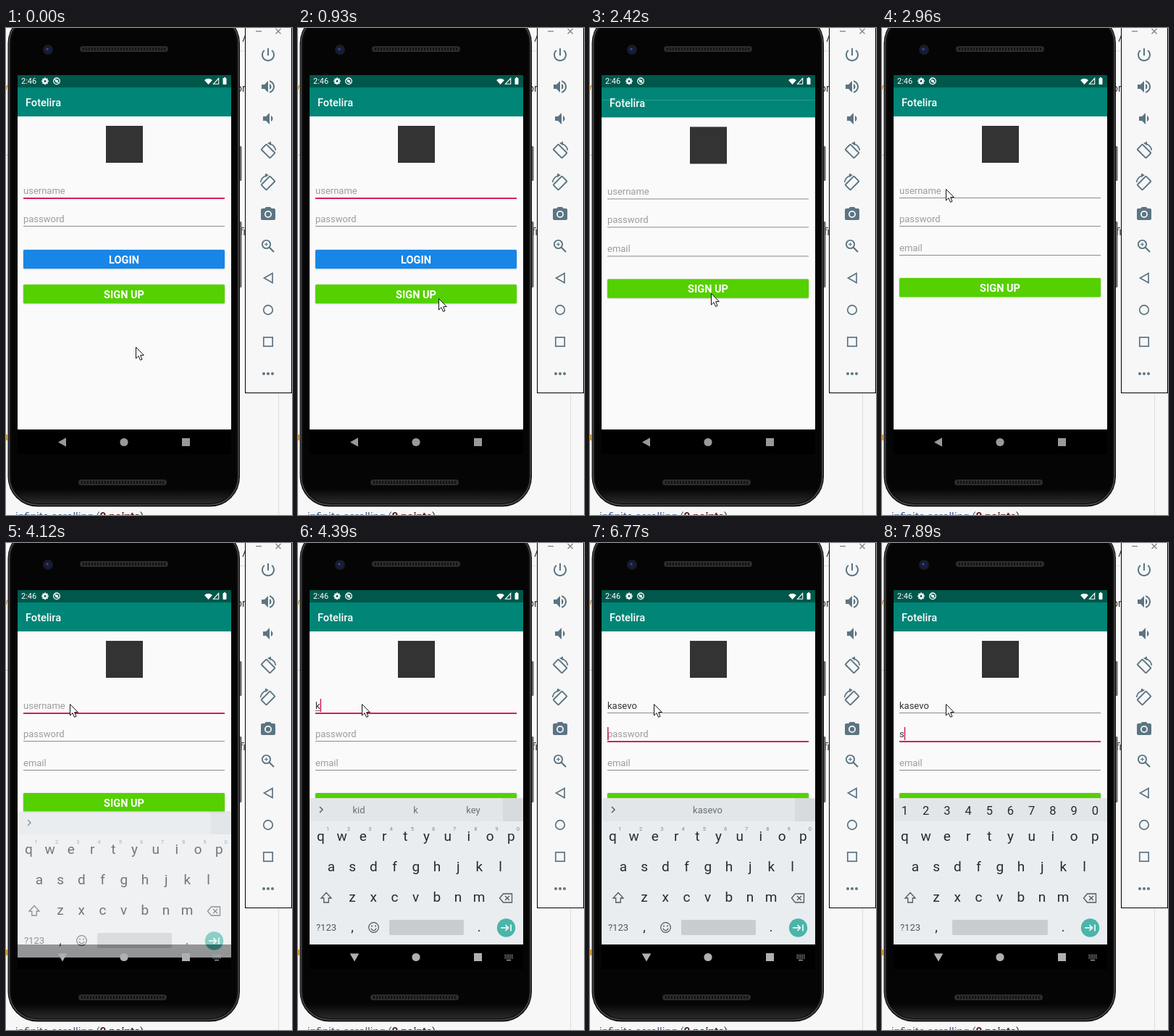
Animation, 395 px wide and 672 px high, one loop 8 s. Source, as an HTML page with a canvas:

```html
<!DOCTYPE html>
<html lang="en">
<head>
<meta charset="utf-8">
<title>Sign-up flow</title>
<style>
html, body { margin: 0; width: 100%; height: 100%; overflow: hidden; background: #f7f7f7; }
canvas { display: block; width: 395px; height: 672px; }
</style>
</head>
<body>
<canvas id="stage"></canvas>
<script>
const W = 395, H = 672, LOOP = 8000;
const dpr = window.devicePixelRatio || 1;

function prepare(canvas) {
  canvas.width = W * dpr;
  canvas.height = H * dpr;
  return canvas.getContext('2d');
}

const stage = prepare(document.getElementById('stage'));
const layer = prepare(document.createElement('canvas'));
let c = stage;

const FONT = 'Roboto, sans-serif';
const PAGE = '#f7f7f7', PINK = '#d81b60', GREEN = '#55d000', BLUE = '#1886e6';
const SLATE = '#5b7583', INK = '#4b585f', KEY = '#222c31';
const NAME = 'kasevo';

// Each list holds [start time, value]; the latest started value applies.
const pointer = [[0, [179, 440]], [270, [180, 440]], [420, [182, 435]], [540, [182, 422]],
  [660, [181, 407]], [810, [189, 387]], [930, [194, 373]], [1080, [182, 369]], [1200, [167, 366]],
  [2720, [140, 318]], [2840, [105, 253]], [2960, [88, 222]]];
const caretOn = [[0, 0], [150, 1], [660, 0], [1080, 1], [1580, 0], [2180, 1], [2300, 0], [3540, 1],
  [4120, 0], [4390, 1], [5690, 0], [6250, 1], [6650, 0], [6770, 1], [7300, 0], [7890, 1]];
const typed = [[0, 0], [4390, 1], [4830, 2], [4980, 3], [5110, 5], [5260, 6]];
const ripple = [[0, [0, 0]], [1880, [133, .12]], [2030, [300, .09]], [2180, [0, 0]]];
const reveal = [[0, 0], [2300, .5], [2420, .93], [2570, 1]];
const backTurn = [[0, 0], [3540, .3], [3660, .75], [3810, 1]];
const keysIn = [[0, [0, 0]], [4120, [.63, 18]], [4270, [.93, 4]], [4390, [1, 0]]];
const hints = [[0, ''], [4390, 'kid key'], [4830, 'kale kay'], [4980, 'case kart'], [5110, 'cases keen'], [5260, '']];

function at(track, t) {
  let value = track[0][1];
  for (const [start, v] of track) if (t >= start) value = v;
  return value;
}

function rect(x, y, w, h, fill) {
  c.fillStyle = fill;
  c.fillRect(x, y, w, h);
}

function round(x, y, w, h, r, fill) {
  c.beginPath();
  c.roundRect(x, y, w, h, r);
  c.fillStyle = fill;
  c.fill();
}

function disc(x, y, r, fill) {
  c.beginPath();
  c.arc(x, y, r, 0, 7);
  c.fillStyle = fill;
  c.fill();
}

function arc(x, y, r, from, to, color, width) {
  c.beginPath();
  c.arc(x, y, r, from, to);
  c.strokeStyle = color;
  c.lineWidth = width;
  c.stroke();
}

function ring(x, y, r, color, width) {
  arc(x, y, r, 0, 7, color, width);
}

function line(points, color, width, closed) {
  c.beginPath();
  points.forEach(([x, y]) => c.lineTo(x, y));
  if (closed) c.closePath();
  c.strokeStyle = color;
  c.lineWidth = width;
  c.stroke();
}

function poly(points, fill) {
  c.beginPath();
  points.forEach(([x, y]) => c.lineTo(x, y));
  c.fillStyle = fill;
  c.fill();
}

function text(s, x, y, size, color, align = 'left', weight = 400) {
  c.font = `${weight} ${size}px ${FONT}`;
  c.textAlign = align;
  c.fillStyle = color;
  c.fillText(s, x, y);
  return x + c.measureText(s).width;
}

function within(x, y, draw, angle = 0) {
  c.save();
  c.translate(x, y);
  c.rotate(angle);
  draw();
  c.restore();
}

const icons = {
  power: 'M13 3h-2v10h2V3zm4.8 2.2l-1.4 1.4C18 7.9 19 9.8 19 12c0 3.9-3.1 7-7 7s-7-3.1-7-7c0-2.2 1-4.1 2.6-5.4L6.2 5.2C4.2 6.8 3 9.3 3 12c0 5 4 9 9 9s9-4 9-9c0-2.7-1.2-5.2-3.2-6.8z',
  louder: 'M3 9v6h4l5 5V4L7 9H3zm13.5 3c0-1.8-1-3.3-2.5-4v8c1.5-.7 2.5-2.2 2.5-4zM14 3.2v2.1c2.9.9 5 3.5 5 6.7s-2.1 5.9-5 6.7v2.1c4-.9 7-4.5 7-8.8s-3-7.9-7-8.8z',
  quieter: 'M18.5 12c0-1.8-1-3.3-2.5-4v8c1.5-.7 2.5-2.2 2.5-4zM5 9v6h4l5 5V4L9 9H5z',
  camera: 'M9 2L7.2 4H4c-1.1 0-2 .9-2 2v12c0 1.1.9 2 2 2h16c1.1 0 2-.9 2-2V6c0-1.1-.9-2-2-2h-3.2L15 2H9zm3 15a5 5 0 1 1 0-10a5 5 0 1 1 0 10z'
};
for (const k in icons) icons[k] = new Path2D(icons[k]);

function icon(name, y) {
  within(350, y - 12, () => {
    c.fillStyle = SLATE;
    c.fill(icons[name], 'evenodd');
  });
}

function rotateIcon(y, flip) {
  within(362, y, () => {
    c.scale(flip, 1);
    within(0, 1, () => {
      c.beginPath();
      c.roundRect(-5, -8.5, 10, 17, 1);
      c.strokeStyle = SLATE;
      c.lineWidth = 1.9;
      c.stroke();
    }, -Math.PI / 4);
    arc(0, 1, 10.5, -1.4, -.1, SLATE, 1.7);
    poly([[-1, -10], [4, -12.5], [4, -7]], SLATE);
  });
}

function toolbar() {
  rect(330, 0, 65, 504, '#000');
  rect(331, 0, 63, 503, PAGE);
  line([[345, 4.5], [353, 4.5]], '#78858c', 1.3);
  line([[372.5, 1], [379.5, 8]], '#78858c', 1.3);
  line([[379.5, 1], [372.5, 8]], '#78858c', 1.3);
  icon('power', 37);
  icon('louder', 81);
  icon('quieter', 125);
  rotateIcon(169, 1);
  rotateIcon(213, -1);
  icon('camera', 257);
  disc(362, 257, 3.2, SLATE);
  ring(359.5, 298.5, 5.6, SLATE, 1.9);
  line([[363.5, 302.5], [370, 309]], SLATE, 2.2);
  line([[357, 298.5], [362, 298.5]], SLATE, 1.1);
  line([[359.5, 296], [359.5, 301]], SLATE, 1.1);
  line([[368, 338.5], [368, 351.5], [356.5, 345]], SLATE, 1.7, true);
  ring(362, 389, 6.3, SLATE, 1.7);
  c.strokeRect(355.8, 426.8, 12.4, 12.4);
  for (const x of [356, 362, 368]) disc(x, 477, 2, SLATE);
}

function backdrop() {
  rect(0, 0, W, H, PAGE);
  rect(323, 31, 7, 1, '#ddd');
  rect(376, 503, 1, 169, '#ddd');
  text('y', -4, 87, 14, '#b98a2c');
  text('or', 318, 88, 14, '#333');
  text('fi', 323, 286, 14, '#333');
  line([[327, 19], [331, 9]], '#333', 1.2);
  rect(0, 175, 3, 1, '#ccc');
  rect(0, 561, 2, 8, '#d49a35');
  let x = text('infinite scrolling (', 13, 679, 15.3, '#3d5f91');
  x = text('0 points', x, 679, 15.3, '#5b2020', 'left', 700);
  text(')', x, 679, 15.3, '#333');
}

function phone() {
  round(321, 163, 4.5, 48, 1.5, '#666');
  round(321, 267, 4.5, 91, 1.5, '#666');
  round(2.5, -20, 320.5, 680.5, 41, '#0b0b0b');
  c.beginPath();
  c.roundRect(4.5, -18, 316.5, 676, 39);
  c.strokeStyle = '#4a4a4a';
  c.lineWidth = 1.6;
  c.stroke();
  const shade = c.createLinearGradient(0, 636, 0, 657);
  shade.addColorStop(0, '#050505');
  shade.addColorStop(1, '#2c2c2c');
  round(7.5, -14, 310.5, 670, 36, shade);
  disc(58, 30, 7, '#1b1c24');
  disc(58, 30, 4, '#151c46');
  disc(57, 29, 1.6, '#3d4b8c');
  for (const [x, y] of [[102, 25], [100, 623]]) {
    round(x, y, 122, 8, 4, '#2c2c2c');
    for (let i = 4; i < 118; i += 4) rect(x + i, y + 2, 2, 4, '#111');
  }
}

function statusBar() {
  rect(16, 65, 295, 17, '#00574b');
  text('2:46', 21, 77, 11, '#fff');
  for (let i = 0; i < 8; i++) within(54, 73.3, () => rect(-1, -4.8, 2, 3, '#fff'), i * Math.PI / 4);
  ring(54, 73.3, 2.6, '#fff', 2);
  ring(70, 73.3, 4.3, '#fff', 1.3);
  ring(70, 73.3, 1.5, '#fff', 1.2);
  line([[67, 70.5], [72.5, 76]], '#fff', 1.2);
  c.beginPath();
  c.moveTo(279.5, 78);
  c.arc(279.5, 78, 8.2, -2.3, -.84);
  c.fillStyle = '#fff';
  c.fill();
  line([[286.5, 77.2], [293.7, 77.2], [293.7, 69.5]], '#fff', 1.1, true);
  round(299.5, 69, 5, 9, 1, '#fff');
  rect(301, 68, 2, 1.5, '#fff');
}

function button(label, y, color) {
  c.save();
  c.shadowColor = 'rgba(0,0,0,.3)';
  c.shadowBlur = 2 * dpr;
  c.shadowOffsetY = .6 * dpr;
  round(24, y, 278, 26, 1.5, color);
  c.restore();
  text(label, 163, y + 18.5, 14.5, '#fff', 'center', 700);
}

function field(hint, value, y, active, caret, composing) {
  const right = text(value || hint, 24, y, 13, value ? '#333' : '#9c9c9c');
  const end = value ? right : 24;
  if (composing && value) rect(24, y + 2, end - 24, .8, '#444');
  if (active) rect(24, y + 5, 278, 2, PINK);
  else rect(24, y + 5, 278, 1, '#8c8c8c');
  if (caret) rect(end, y - 14, 1.5, 18, PINK);
}

function appPage() {
  rect(16, 65, 295, 490, '#fafafa');
  rect(16, 82, 295, 40, '#008577');
  statusBar();
  text('Fotelira', 27, 107.5, 14.6, '#fff', 'left', 500);
  rect(138, 135, 51, 51, '#333');
}

function loginPage(t) {
  appPage();
  field('username', '', 229, true, at(caretOn, t));
  field('password', '', 268, false, false);
  button('LOGIN', 306, BLUE);
  button('SIGN UP', 354, GREEN);
  const [r, alpha] = at(ripple, t);
  if (r) {
    c.save();
    c.beginPath();
    c.rect(24, 354, 278, 26);
    c.clip();
    disc(168, 367, r, `rgba(0,0,0,${alpha})`);
    c.restore();
  }
}

function signupPage(t) {
  appPage();
  const focus = t < 3420 ? 0 : t < 6650 ? 1 : 2;
  const caret = at(caretOn, t);
  field('username', NAME.slice(0, at(typed, t)), 229, focus === 1, focus === 1 && caret, focus === 1);
  field('password', t >= 7890 ? 's' : '', 268, focus === 2, focus === 2 && caret);
  field('email', '', 308, false, false);
  button('SIGN UP', 345, GREEN);
}

function navBar(t) {
  const turn = at(backTurn, t), color = turn ? '#b0b0b0' : '#999';
  within(78, 571.5, () => poly([[-6, 0], [5, -6.3], [5, 6.3]], color), -turn * Math.PI / 2);
  disc(163, 571.5, 5.6, color);
  rect(243, 566, 11, 11, color);
  if (t >= 4120) {
    for (let row = 0; row < 3; row++)
      for (let i = 0; i < 5; i++) rect(285.5 + i * 2.4, 568 + row * 2.2, 1.4, 1.2, color);
    rect(288, 575, 6, 1.2, color);
  }
}

function keyRow(letters, x, y, size, sup) {
  [...letters].forEach((ch, i) => {
    text(ch, x + i * 29.2, y, size, KEY, 'center');
    if (sup) text((i + 1) % 10, x + 9.5 + i * 29.2, 397, 7.5, '#7d878c', 'center');
  });
}

function suggestions(t) {
  rect(283, 352, 28, 32, '#d7dbde');
  line([[30, 364], [34, 368], [30, 372]], INK, 1.4);
  const [left, right] = at(hints, t).split(' ');
  const words = [[left, 84], [NAME.slice(0, at(typed, t)), 162.5], [right || '', 242]];
  for (const [word, x] of words) text(word, x, 373, 13, '#667178', 'center');
}

function keys(t) {
  const secret = t >= 6920;
  rect(16, 352, 295, 202, '#e9edf0');
  rect(16, 352, 295, 32, '#e2e6e9');
  if (secret) keyRow('1234567890', 31.5, 374.5, 16.5);
  else suggestions(t);
  keyRow('qwertyuiop', 31.5, 411, 19, !secret);
  keyRow('asdfghjkl', 46, 453, 19);
  keyRow('zxcvbnm', 75, 495, 19);
  line([[39, 482.5], [46, 490], [42.3, 490], [42.3, 496], [35.7, 496], [35.7, 490], [32, 490]], INK, 1.3, true);
  line([[278.5, 490], [283.5, 484], [295.5, 484], [295.5, 496], [283.5, 496]], INK, 1.3, true);
  line([[286, 487], [292, 493]], INK, 1.2);
  line([[292, 487], [286, 493]], INK, 1.2);
  text('?123', 39, 535, 13, INK, 'center');
  text(',', 75, 536, 18, KEY, 'center');
  text('.', 250, 536, 18, KEY, 'center');
  if (!secret) {
    ring(104.5, 530.5, 6.8, INK, 1.2);
    disc(102, 528.5, 1, INK);
    disc(107, 528.5, 1, INK);
    arc(104.5, 531, 3.6, .2, 2.94, INK, 1.2);
  }
  const space = secret ? 97 : 126;
  round(space, 520, 229 - space, 21, 2, '#c9cdd0');
  disc(287.5, 531, 12.7, '#4ab5aa');
  line([[280, 531], [290, 531]], '#fff', 1.6);
  line([[286.5, 527], [290.5, 531], [286.5, 535]], '#fff', 1.6);
  line([[294, 526.5], [294, 535.5]], '#fff', 1.6);
}

// The keyboard is painted on its own layer so that it fades as one.
function keyboard(t) {
  const [alpha, drop] = at(keysIn, t);
  if (!alpha) return;
  c = layer;
  c.setTransform(dpr, 0, 0, dpr, 0, 0);
  c.clearRect(0, 0, W, H);
  keys(t);
  c = stage;
  c.globalAlpha = alpha;
  c.drawImage(layer.canvas, 0, drop, W, H);
  c.globalAlpha = 1;
}

function screen(t) {
  const p = at(reveal, t);
  c.save();
  c.beginPath();
  c.rect(16, 65, 295, 490);
  c.clip();
  if (p < 1) loginPage(t);
  if (p > 0) {
    c.beginPath();
    c.rect(16, 555 - p * 490, 295, p * 490);
    c.clip();
    within(0, (1 - p) * 20, () => signupPage(t));
  }
  c.restore();
}

function arrow(x, y) {
  const shape = [[.5, .5], [.5, 16], [4, 12.6], [6.5, 18.3], [9, 17.2], [6.6, 11.7], [11.3, 11.5]];
  within(x, y, () => {
    poly(shape, '#fff');
    line(shape, '#111', 1, true);
  });
}

function draw(t) {
  c.setTransform(dpr, 0, 0, dpr, 0, 0);
  backdrop();
  phone();
  screen(t);
  rect(16, 554, 295, 34, '#000');
  keyboard(t);
  navBar(t);
  toolbar();
  arrow(...at(pointer, t));
}

const begin = performance.now();
function frame() {
  draw((performance.now() - begin) % LOOP);
  requestAnimationFrame(frame);
}
draw(0);
requestAnimationFrame(frame);
</script>
</body>
</html>
```
